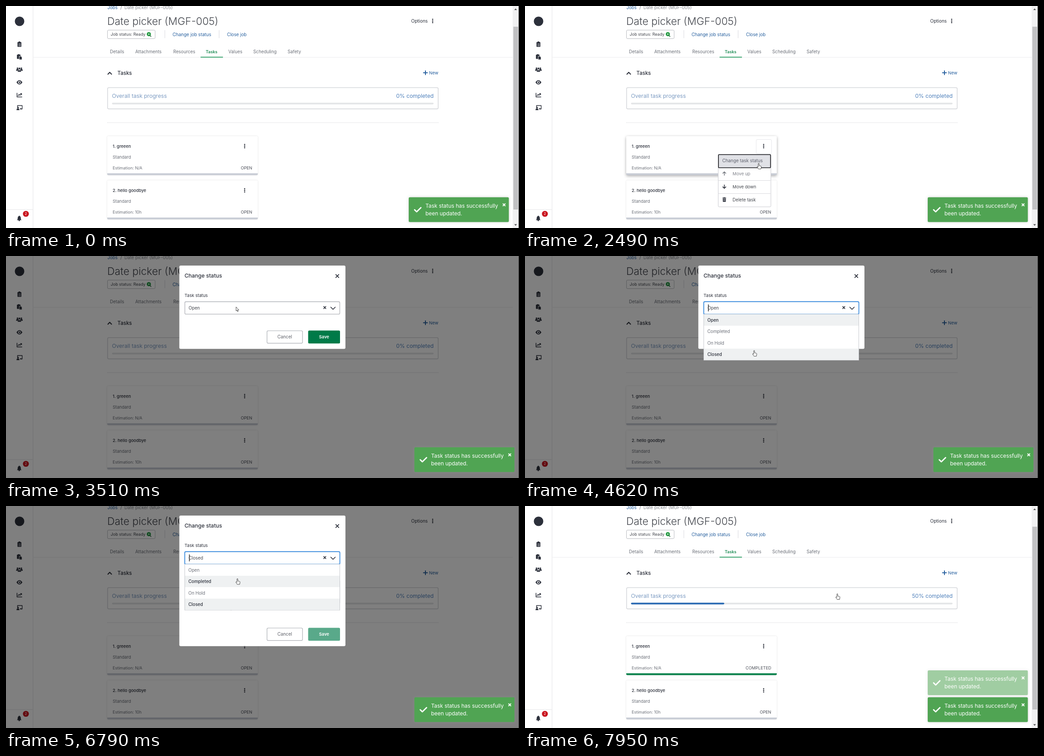
An HTML page for the animation above (8 s loop, 1135 by 493 pixels).

```html
<!DOCTYPE html>
<html lang="en">
<head>
<meta charset="utf-8">
<title>Change task status</title>
<style>
  html, body { margin: 0; width: 100%; height: 100%; overflow: hidden; background: #fff; }
  svg { display: block; width: 100vw; height: 100vh; font-family: Inter, "Open Sans", sans-serif; }
  text { white-space: pre; }
  .card { filter: drop-shadow(0 0 1.5px #0002); }
  .raised { filter: drop-shadow(0 2px 3px #0005); }
  .toast { filter: drop-shadow(0 0 3px #9996); }
  .line { fill: none; stroke-linecap: round; stroke-linejoin: round; }
</style>
</head>
<body>
<svg id="stage" viewBox="0 0 1135 493" preserveAspectRatio="none"></svg>
<script>
const INK = '#2c303b', GREY = '#6c7079', BLUE = '#27609f', GREEN = '#007a48';
const LOOP = 8000;
const STATUSES = ['Open', 'Completed', 'On Hold', 'Closed'];
const ROW_TOP = 129.5, ROW_HEIGHT = 25.4;

// Markup helpers
const text = (x, y, label, size = 9.8, fill = INK, extra = '') =>
  `<text x="${x}" y="${y}" font-size="${size}" fill="${fill}" ${extra}>${label}</text>`;
const rect = (x, y, w, h, fill, extra = '') =>
  `<rect x="${x}" y="${y}" width="${w}" height="${h}" fill="${fill}" ${extra}/>`;
const outline = (x, y, w, h, stroke, extra = '') =>
  rect(x, y, w, h, '#fff', `rx="2.5" stroke="${stroke}" ${extra}`);
const path = (d, fill = INK, extra = '') => `<path d="${d}" fill="${fill}" ${extra}/>`;
const line = (d, stroke, width = 1, extra = '') =>
  `<path class="line" d="${d}" stroke="${stroke}" stroke-width="${width}" ${extra}/>`;
const dot = (x, y, r, fill = INK) => `<circle cx="${x}" cy="${y}" r="${r}" fill="${fill}"/>`;
const at = (x, y, content) => `<g transform="translate(${x} ${y})">${content}</g>`;
const group = (id, content, extra = '') => `<g id="${id}" ${extra}>${content}</g>`;
const kebab = (x, y) => [-3.6, 0, 3.6].map(d => dot(x, y + d, 1.35)).join('');
const cross = (x, y, r, color, width) =>
  line(`M${x - r} ${y - r}l${2 * r} ${2 * r}m0 ${-2 * r}l${-2 * r} ${2 * r}`, color, width);
const bold = 'font-weight="600"', medium = 'font-weight="500"', light = 'font-weight="300"';
const end = 'text-anchor="end"', middle = 'text-anchor="middle"';

function sidebar() {
  const person = (x, y, s) => dot(x, y - 2.6 * s, 1.9 * s) + path(`M${x - 3.4 * s} ${y + 3.6 * s}q0-4 ${3.4 * s}-4t${3.4 * s} 4z`);
  const clipboard = rect(-4.3, -4.5, 8.6, 10.5, INK, 'rx="1"') + rect(-2, -6, 4, 3, INK, 'rx="1"') +
    line('M-2.2-.8h.2M0-.8h2.4M-2.2 1.7h.2M0 1.7h2.4M-2.2 4h.2M0 4h2.4', '#fff', .9);
  const paste = rect(-5.5, -5, 8, 9.5, INK, 'rx="1"') + rect(-3.3, -6, 3.6, 2, INK, 'rx="1"') +
    path('M-.5-1.5h3.8l2.4 2.4v5.3h-6.2z', INK, 'stroke="#fff" stroke-width=".8"');
  const users = person(-4.3, -.6, .9) + person(4.3, -.6, .9) +
    `<g stroke="#fff" stroke-width=".5">${person(0, .8, 1.2)}</g>`;
  const eye = path('M-6.5 0Q-3.5-4.8 0-4.8T6.5 0Q3.5 4.8 0 4.8T-6.5 0z') + dot(0, 0, 3, '#fff') + dot(.2, 0, 1.8);
  const chart = line('M-5.3-4.3V4.3H5.5M-3 1.4L-.6-1.3 1.2.5 4.6-3M2.3-3.3H4.8V-.8', INK, 1.5);
  const teacher = line('M-4.2-2V-5H6V2.8H2.2', INK, 1.4) + rect(1.2, 1.3, 3.6, 1.8, INK) + person(-3.2, 2, .95);
  const bell = path('M-5 4q1.6-1.6 1.6-4.5Q-3.4-4.6 0-5t3.4 4.5Q3.4 2.4 5 4z') + dot(0, 4.7, 1.5) + dot(0, -5, .9);
  const icons = [clipboard, paste, users, eye, chart, teacher];
  return rect(59, 0, 1.5, 493, '#ececee') + line('M0 452H59', '#e4e4e6') + dot(30, 34, 10.5) +
    icons.map((icon, i) => at(29.7, 84.7 + 28.25 * i, icon)).join('') + at(29.3, 471.5, bell) +
    dot(44, 461.5, 6.6, '#c9141e') + text(44, 464.3, '2', 8, '#fff', middle);
}

function header() {
  const tabs = [['Details', 230], ['Attachments', 286], ['Resources', 370], ['Values', 492], ['Scheduling', 547], ['Safety', 623]];
  return text(224.5, 6.5, 'Jobs', 9.7, BLUE) + text(253, 6.5, '/', 9.8, GREY) +
    text(262, 6.5, 'Date picker (MGF-005)', 9.75, '#85888e') +
    text(224, 42, 'Date picker (MGF-005)', 22.9, '#44474e', light) +
    text(896.5, 37, 'Options', 10, INK) + kebab(944, 33.3) +
    outline(224.5, 53.5, 105.5, 19, '#b9bbc0') + text(231.5, 66.2, 'Job status: Ready', 9.15, '#44474e') +
    dot(316, 62.5, 4.6, '#259a43') + line('M314.5 62.5h3m-1.5-1.5v3', '#fff', .9) + line('M318.5 65.5l2.3 2.3', '#1b5e30', 1.6) +
    line('M351.5 54V71M471.5 54V71', '#d9dade') +
    text(368.5, 66.5, 'Change job status', 10, BLUE) + text(489, 66.5, 'Close job', 9.8, BLUE) +
    tabs.map(([name, x]) => text(x, 105.3, name, 9.8, GREY)).join('') +
    text(442, 105.3, 'Tasks', 9.1, '#178a50', bold) +
    line('M61 114H1121', '#ebecee') + rect(430.5, 112.7, 49.5, 1.8, '#2a9d63');
}

function card(id, y, title, estimate) {
  return at(0, y, group(id, rect(224, 0, 333, 86, '#fff', 'rx="2.5"') +
      path('M224 82.5H557V84q0 2.5-2.5 2.5h-328q-2.5 0-2.5-2.5z', '#c8ccd5', `id="${id}-edge"`), 'class="card"') +
    text(236, 25.8, title, 9.35, INK, medium) + kebab(528, 22.2) +
    text(236, 49.7, 'Standard', 9.5, GREY) + text(236, 73.7, 'Estimation: ' + estimate, 9.05, GREY) +
    text(544.8, 73.8, 'OPEN', 9.2, '#4d515a', `${end} id="${id}-status"`));
}

function tasks() {
  return line('M225.5 151.5l4-4.2 4 4.2', INK, 2) + text(246.5, 152.5, 'Tasks', 11.5, INK, medium) +
    line('M923.7 148.3h8.6m-4.3-4.3v8.6', BLUE, 2) + text(936, 152, 'New', 9.6, BLUE) +
    outline(224.8, 181.3, 731.4, 47.2, '#cfd1d5', 'stroke-width="1.3"') +
    text(234.5, 203.5, 'Overall task progress', 12.1, '#7c9bc2') +
    text(946, 203.5, '0% completed', 12, '#4f80bb', `${end} id="percent"`) +
    rect(234.5, 214.7, 711.5, 3.7, '#e4e5e7', 'rx="1.8"') + rect(234.5, 214.7, 0, 3.7, '#2a6ab3', 'rx="1.8" id="progress"') +
    line('M224.5 259H957', '#d3d5d9', 1, 'stroke-dasharray="1 2"') +
    card('card1', 289, '1. greeen', 'N/A') + card('card2', 387.2, '2. hello goodbye', '10h');
}

function menu() {
  const arrow = 'M0 4V-3.5M-3.4-.4L0-3.8 3.4-.4';
  const trash = rect(-4, -4.4, 8, 1.4, INK) + rect(-1.4, -5.2, 2.8, 1.2, INK) + path('M-3.5-2.3h7L3.1 5h-6.2z') +
    line('M-1.4-.8v4M0-.8v4M1.4-.8v4', '#fff', .5);
  return outline(511.5, 296.5, 34, 31.5, '#e6e7ea') + kebab(528, 311.2) +
    group('menuList', rect(427.5, 329.5, 116.5, 116.5, '#fff', 'rx="2" stroke="#c9cad0"') +
      rect(428, 330, 115.3, 29.3, '#fff', 'rx="1.5" id="firstItem"') +
      line('M428 387.5H543M428 416.5H543', '#d9dade') +
      text(436.5, 347, 'Change task status', 9.9, '#5c5f6b') +
      text(459.3, 375.8, 'Move up', 9.55, '#80838b') + text(459.3, 404.8, 'Move down', 9.5, '#44474e') +
      text(459.3, 433.8, 'Delete task', 9.7, '#44474e') +
      at(441, 372, line(arrow, '#666a72', 1.4)) + at(441, 401.2, `<g transform="scale(1 -1)">${line(arrow, INK, 1.6)}</g>`) +
      at(441, 430, trash));
}

function dialog() {
  const rows = STATUSES.map((name, i) => {
    const y = ROW_TOP + i * ROW_HEIGHT;
    return rect(396, y, 342, ROW_HEIGHT, '#fff', `id="row${i}"`) + text(403.5, y + 16.2, name, 9.7, GREY, `id="label${i}"`);
  }).join('');
  return rect(0, 0, 1134, 493, '#000', 'opacity=".5"') +
    rect(383.5, 21.3, 367.5, 185, '#fff', 'rx="3" id="panel"') +
    text(395, 48.3, 'Change status', 12, INK, medium) + cross(733, 44.5, 3.3, INK, 1.7) +
    text(395, 91.3, 'Task status', 9.6, INK) +
    rect(394, 100, 346, 31, '#a9cff6', 'rx="4" id="ring"') +
    outline(395.7, 101.5, 342.8, 27.7, '#b0b2b8', 'stroke-width="1.3" id="select"') +
    text(404, 119, 'Open', 9.75, '#44474e', 'id="value"') +
    cross(705.3, 114.5, 2.3, INK, 1.7) + line('M718.5 113.5l5 5 5-5', INK, 1.6) +
    rect(405, 107.5, 1.2, 15.5, '#000', 'id="caret"') +
    group('reason', text(395, 153.8, 'Reason', 9.7) +
      outline(395.7, 164.2, 342.8, 53.6, '#b0b2b8', 'stroke-width="1.3"') +
      text(405, 180, 'Enter text...', 9.4, '#9a9da4') + line('M730.5 215.5l5-5m-2 5l2-2', '#555', .9) +
      text(398.5, 229.8, '500 characters remaining', 8.45, GREY)) +
    group('buttons', outline(577.5, 166, 78.5, 27.7, '#aaadb3', 'stroke-width="1.2"') +
      text(616.7, 183, 'Cancel', 9.9, '#5c5f67', middle) +
      rect(666.7, 164, 74, 31.8, '#93cfb2', 'rx="4" id="saveRing"') +
      rect(668.5, 165.5, 70.5, 28.7, GREEN, 'rx="2.5" id="save"') + text(703.7, 183, 'Save', 9.5, '#fff', `${middle} ${bold}`)) +
    group('dropdown', rect(395.5, 129.5, 343, 101.7, '#fff', 'stroke="#c6c8cd"') + rows);
}

const toast = id => group(id, rect(891, 424.8, 221.5, 55, '#50a453', 'rx="2.5" class="toast"') +
  line('M904 452.5l4.6 4.6 9.4-9.4', '#fff', 2.8) + cross(1102, 441.5, 2.3, '#fff', 2) +
  text(928, 447.7, 'Task status has successfully', 11.9, '#fff') + text(928, 464.5, 'been updated.', 11.9, '#fff'));

const scrollbar = rect(1121, 0, 13, 493, '#f1f1f2') + rect(1122.5, 46, 10.5, 406, '#c1c1c3') +
  path('M1124.5 9h6l-3-3.5z', '#555') + path('M1124.5 484.5h6l-3 3.5z', '#555');

const pointer = 'stroke="#222" stroke-width=".8" stroke-linejoin="round"';
document.getElementById('stage').innerHTML = rect(0, 0, 1135, 493, '#fff') + sidebar() + header() + tasks() +
  group('menu', menu()) + group('scrollbar', scrollbar) + group('dialog', dialog()) + rect(1134, 0, 1, 493, '#333') +
  toast('oldToast') + toast('newToast') +
  group('cursor', path('M0 0V9L2 7.2 3.3 10.6 4.8 10 3.4 6.8H6.2Z', '#fff', `id="arrow" ${pointer}`) +
    path('M-1 1Q0-.6 1 1V5.5L4.6 6.4Q6 6.8 5.8 8.2L5 13H-.4L-3.4 8.6Q-3.6 7-2.2 7.4L-1 8.6Z', '#fff', `id="hand" ${pointer}`));

// Timeline
const byId = id => document.getElementById(id);
const show = (id, visible) => byId(id).setAttribute('display', visible ? 'inline' : 'none');
const set = (id, name, value) => byId(id).setAttribute(name, value);
const during = (t, ...spans) => spans.some(([from, to]) => t >= from && t < to);
const clamp = v => Math.min(1, Math.max(0, v));

// Cursor path as [time, x, y]
const CURSOR = [
  [0, 407, 83], [1000, 407, 83], [1770, 524, 311], [2100, 524, 311], [2320, 517, 349],
  [2820, 517, 349], [3500, 509, 113], [3680, 509, 113], [4040, 508, 200], [4400, 508, 200],
  [4620, 507, 209.5], [4900, 507, 209.5], [5010, 677, 224], [5120, 677, 224], [5340, 686, 262],
  [5520, 686, 262], [5810, 624.5, 267], [6060, 512, 114], [6400, 512, 114], [6790, 512, 161],
  [7010, 512, 161], [7410, 691, 190], [7570, 691, 194.5], [LOOP, 691, 194.5]
];

function cursorAt(t) {
  const next = CURSOR.findIndex(([time]) => time > t);
  const [t0, x0, y0] = CURSOR[next - 1], [t1, x1, y1] = CURSOR[next];
  const p = (t - t0) / (t1 - t0), eased = p * p * (3 - 2 * p);
  return [x0 + (x1 - x0) * eased, y0 + (y1 - y0) * eased];
}

function render(t) {
  const [x, y] = cursorAt(t);
  const hand = during(t, [1690, 2880], [3800, 4950], [6550, 7010], [7410, LOOP]);
  set('cursor', 'transform', `translate(${x} ${y})`);
  show('cursor', t >= 250);
  show('hand', hand);
  show('arrow', !hand);

  set('card1', 'class', during(t, [1600, 2650]) ? 'raised' : 'card');
  show('menu', during(t, [1770, 2570]));
  show('menuList', t >= 1920);
  const pressed = t >= 2490;
  set('firstItem', 'fill', pressed ? '#e0e1e6' : t >= 2320 ? '#f5f5f7' : '#fff');
  set('firstItem', 'stroke', pressed ? '#1c1c20' : 'none');
  set('firstItem', 'stroke-width', 1.6);

  const modal = during(t, [2570, 7810]);
  const selected = t < 4950 ? 0 : t < 7010 ? 3 : 1;
  const focused = during(t, [3580, 7600]);
  const open = during(t, [3580, 4950], [6300, 7010]);
  const closing = selected === 3;
  show('dialog', modal);
  show('scrollbar', !modal);
  show('ring', focused);
  set('select', 'stroke', focused ? '#2f82d6' : '#b0b2b8');
  byId('value').textContent = STATUSES[selected];
  show('caret', focused && Math.floor((t - 3580) / 500) % 2 === 0);
  show('reason', closing);
  set('panel', 'height', closing ? 290 : 185);
  set('buttons', 'transform', `translate(0 ${closing ? 105 : 0})`);
  set('save', 'fill', closing ? '#59a98a' : t >= 7450 ? '#00653c' : GREEN);
  show('saveRing', t >= 7650);
  show('dropdown', open);
  const hovered = Math.floor((y - ROW_TOP) / ROW_HEIGHT);
  STATUSES.forEach((_, i) => {
    const active = i === selected || i === hovered;
    set('row' + i, 'fill', active ? '#eff1f2' : '#fff');
    set('label' + i, 'fill', active ? INK : GREY);
    set('label' + i, 'font-weight', active ? 500 : 400);
  });

  const done = t >= 7750;
  const grown = clamp((t - 7740) / 600);
  byId('percent').textContent = (done ? 50 : 0) + '% completed';
  set('progress', 'width', 356 * (1 - (1 - grown) ** 2));
  byId('card1-status').textContent = done ? 'COMPLETED' : 'OPEN';
  set('card1-edge', 'fill', done ? '#078049' : '#c8ccd5');
  const shift = modal ? 12.5 : 0;
  set('oldToast', 'transform', `translate(${shift} 0)`);
  set('newToast', 'transform', `translate(${shift} -59.7)`);
  set('newToast', 'opacity', clamp((t - 7790) / 300));
}

const start = performance.now();
function frame() {
  render((performance.now() - start) % LOOP);
  requestAnimationFrame(frame);
}
frame();
</script>
</body>
</html>
```
